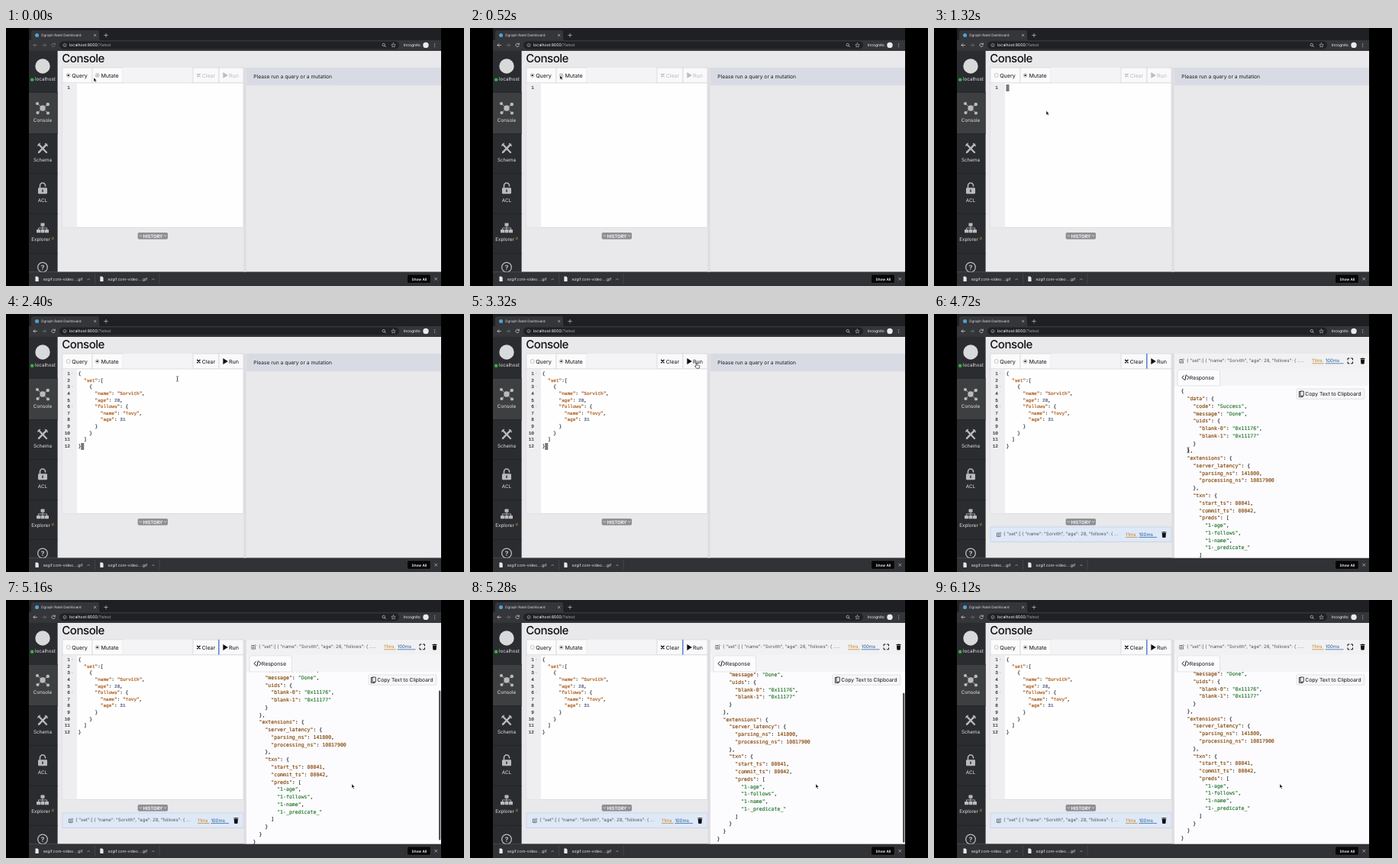
Recreate the animation shown at these times as an HTML page. Size 600 by 338 pixels, loop 6.2 s.

```html
<!DOCTYPE html>
<html lang="en">
<head>
<meta charset="utf-8">
<title>Console</title>
<style>
html, body { margin: 0; width: 100%; height: 100%; overflow: hidden; background: #000; }
svg { display: block; width: 100%; height: 100%; }
text { font-family: Inter, Roboto, sans-serif; white-space: pre; text-rendering: geometricPrecision; }
.line { fill: none; stroke-linecap: round; stroke-linejoin: round; }
.code text, .code tspan { font: 6.05px "Liberation Mono", monospace; }
.json text, .json tspan { font: 6.55px "DejaVu Sans Mono", monospace; }
.code text, .code tspan, .json text, .json tspan { fill: currentColor; stroke: currentColor; stroke-width: .16; }
</style>
</head>
<body>
<svg id="stage" viewBox="0 0 600 338"></svg>
<script>
const LOOP = 6200, STEP = 40;
const TOP = 29.8, BOTTOM = 319.7, SIDE = 67.6;
const person = "Sorvith", friend = "Tovy";

// Markup helpers
const rect = (x, y, w, h, fill, more = "") =>
  `<rect x="${x}" y="${y}" width="${w}" height="${h}" fill="${fill}" ${more}/>`;
const dot = (x, y, r, fill, more = "") => `<circle cx="${x}" cy="${y}" r="${r}" fill="${fill}" ${more}/>`;
const text = (x, y, size, fill, s, more = "") =>
  `<text x="${x}" y="${y}" font-size="${size}" fill="${fill}" color="${fill}" ${more}>${s}</text>`;
const fillPath = (d, fill, more = "") => `<path d="${d}" fill="${fill}" ${more}/>`;
const line = (d, color, width = .6, more = "") =>
  `<path class="line" d="${d}" stroke="${color}" stroke-width="${width}" ${more}/>`;
const group = (id, body, more = "") => `<g id="${id}" ${more}>${body}</g>`;
const at = (x, y, body) => `<g transform="translate(${x} ${y})">${body}</g>`;
const cross = (x, y, r, color, width) =>
  line(`M${x - r} ${y - r}l${2 * r} ${2 * r}m0 ${-2 * r}l${-2 * r} ${2 * r}`, color, width);

// One <text> per line, tokens coloured as key, string or number
function codeLines(src, x, y, pitch, base, key, str, num) {
  return src.split("\n").map((row, i) => text(x, (y + i * pitch).toFixed(2), 6, base,
    row.replace(/"[^"]*"(?=(:?))|\b\d+/g, (s, colon) =>
      `<tspan color="${s[0] !== '"' ? num : colon ? key : str}">${s}</tspan>`))).join("");
}

const query = { set: [{ name: person, age: 28, follows: { name: friend, age: 31 } }] };
const reply = {
  data: { code: "Success", message: "Done", uids: { "blank-0": "0x11176", "blank-1": "0x11177" } },
  extensions: {
    server_latency: { parsing_ns: 141800, processing_ns: 10817900 },
    txn: { start_ts: 80041, commit_ts: 80042, preds: ["1-age", "1-follows", "1-name", "1-_predicate_"] }
  }
};
const queryText = JSON.stringify(query, null, 2).replace(": [", ":[");
const brief = `{ "set":[ { "name": "${person}", "age": 28, "follows": { ...`;

// Icons
const trash = (x, y) => at(x, y,
  fillPath("M-3 -3.4h2l.5-.6h1l.5.6h2v.9h-6zM-2.6 -2.1h5.2l-.4 5.4q0 .7-.7.7h-3q-.7 0-.7-.7z", "#111"));
const edit = (x, y) => at(x, y, line("M.4-2h-3v4.6h4.6v-2.2", "#444", .7) +
  line("M-.9 1l.2-1.2 2.7-2.7 1 1-2.7 2.7z", "#444", .6));
const latency = (x, y, end) =>
  text(x, y, 6, "#c07f1c", "11ms") + text(x + 17.4, y, 6, "#1f5c9c", "100ms") +
  rect(x, y + 1.2, 15.5, .7, "#c07f1c") + rect(x + 17.4, y + 1.2, end - x - 17.4, .7, "#1f5c9c");
const radio = (id, x) => dot(x, 62, 2.5, "#fff", 'stroke="#888" stroke-width=".5"') + dot(x, 62, 1.3, "#333", `id="${id}"`);

function chrome() {
  const pale = "#dcdde0";
  const file = x => fillPath(`M${x - 2} 325.5h2.8l1.4 1.4v5.2h-4.2z`, "#e8eaed") +
    text(x + 8.2, 331.3, 5.15, "#e4e5e8", "ezgif.com-video....gif") +
    line(`M${x + 66.2} 329.8l1.4-1.4 1.4 1.4`, "#c4c6ca") + rect(x + 75.5, 321.5, .5, 14, "#55575b");
  return rect(30, 0, 540, 16, "#1f2023") + fillPath("M31 16q2 0 2-2v-8.5q0-2.5 2.5-2.5h84q2.5 0 2.5 2.5v8.5q0 2 2 2z", "#35363a") +
    dot(40.5, 9.5, 2.5, "#4fa3d8") + text(46.2, 11, 4.55, pale, "Dgraph Ratel Dashboard") +
    cross(116.6, 9.5, 1.3, pale, .6) + line("M128.7 9.5h4.6m-2.3-2.3v4.6", pale) +
    rect(30, 16, 540, TOP - 16, "#35363a") + rect(70, 17.5, 445, 10, "#202124", 'rx="5"') +
    group("nav", line("M40.6 22.5h-4.6m2-2l-2 2 2 2", pale, .7) +
      line("M64 21.2a2.2 2.2 0 1 0 .2 2M64.3 20v1.5h-1.5", pale, .7)) +
    line("M47.8 22.5h4.6m-2-2l2 2-2 2", "#77797d", .7) +
    dot(77, 22.5, 2, "none", `stroke="${pale}" stroke-width=".5"`) + rect(76.75, 22.2, .5, 1.4, pale) +
    text(83, 24.4, 5.2, "#fff", 'localhost:8000<tspan fill="#9aa0a6">/?latest</tspan>') +
    dot(494.7, 22, 1.7, "none", `stroke="${pale}" stroke-width=".6"`) + line("M496 23.3l1.5 1.5", pale, .7) +
    line("M507.5 19.9l.8 1.8 1.9.2-1.4 1.3.4 1.9-1.7-1-1.7 1 .4-1.9-1.4-1.3 1.9-.2z", pale, .5) +
    text(521, 24.3, 4.95, "#fff", "Incognito") + dot(550, 22.4, 3.7, "#e8eaed") +
    [20.6, 22.5, 24.4].map(y => dot(561.7, y, .5, pale)).join("") +
    rect(30, BOTTOM, 540, 338 - BOTTOM, "#303236") + file(40.5) + file(125.3) +
    rect(525.7, 323, 30.5, 11.3, "#060606", 'rx="1.5" stroke="#484a4e" stroke-width=".5"') +
    text(531.6, 330.5, 4.7, "#fff", "Show All", 'font-weight="600"') + cross(563.2, 328.7, 1.6, pale, .6);
}

function sidebar() {
  const ink = "#b9babc", back = "#2b2c2f";
  const label = (y, s) => text(48, y, 6.3, "#e2e2e4", s, 'text-anchor="middle"');
  const nodes = [[-7, -6, 2.1], [6.8, -5, 2.3], [-6.5, 6, 2.1], [7, 6.5, 2.1]];
  return rect(30, TOP, SIDE - 30, BOTTOM - TOP, back) + rect(30, 84, SIDE - 30, 54, "#3e3f41") +
    [84, 138, 190.5, 243, 295].map(y => rect(30, y, SIDE - 30, .6, "#1d1e20")).join("") +
    dot(48, 50, 9.7, "#d8d9db") + dot(34.2, 67.8, 2.3, "#2fb344") + text(38, 69.3, 6.3, "#e2e2e4", "localhost") +
    at(48, 105, dot(0, 0, 3.7, ink) + nodes.map(([x, y, r]) =>
      line(`M0 0L${x} ${y}`, ink, .7) + dot(x, y, r, ink)).join("")) + label(122.8, "Console") +
    at(48, 157.5, line("M-5-5L5 5.5", ink, 2.3) + line("M5-4.8L-5 5.3", ink, 2.5) +
      line("M-6.3-3.5l2.8-2.8M3.5-6l3 3", ink, 1.2)) + label(175.2, "Schema") +
    at(48, 210, rect(-6, -.8, 12, 8, ink, 'rx="1.2"') + line("M-3.5-1v-2.5a3.5 3.5 0 0 1 7 0v.5", ink, 1.6) +
      rect(-.7, 1.5, 1.4, 3.5, back)) + label(227.5, "ACL") +
    at(48, 262, [[-2.5, -6.5], [-8, 2], [-2.5, 2], [3, 2]].map(([x, y]) => rect(x, y, 5, 4.3, ink, 'rx=".6"')).join("") +
      line("M0-2v4M-5.5 2v-2h11v2", ink, .9)) + text(33.2, 279.2, 6.3, "#e2e2e4", "Explorer") +
    text(60.3, 276.5, 4.5, "#c9b04a", "β") +
    dot(48, 313.5, 6.3, "none", `stroke="${ink}" stroke-width="1.3"`) +
    text(48, 316.8, 9, ink, "?", 'text-anchor="middle" font-weight="700"');
}

function editor() {
  const edge = 'stroke="#cfced1" stroke-width=".6"';
  const numbers = n => text(84, (80 + n * 8.64).toFixed(2), 6, "#333", n + 1, 'text-anchor="end"');
  const history = rect(74, 279, 237, 19.5, "#dfe8f7", 'stroke="#b8c9e6" stroke-width=".6"') +
    edit(85, 289) + trash(301.3, 289);
  return text(73.3, 44.7, 15, "#111", "Console", 'font-weight="500" letter-spacing="-.45"') +
    rect(74, 52, 39, 20, "#fbfbfc", edge) + rect(113, 52, 40, 20, "#fbfbfc", edge) +
    rect(153, 52, 92, 20, "#f4f3f5") + rect(245, 52, 34, 20, "#f9f8fa", edge) + rect(279, 52, 32, 20, "#f9f8fa", edge) +
    radio("pickQuery", 81.7) + radio("pickMutate", 119.6) +
    text(86.2, 64.6, 7.1, "#111", "Query") + text(124.5, 64.6, 7.05, "#111", "Mutate") +
    group("actions", cross(252.3, 62, 1.7, "currentColor", 1.5) + text(256.8, 64.6, 6.9, "currentColor", "Clear") +
      fillPath("M284.3 58l6.5 4-6.5 4z", "currentColor") + text(291.9, 64.6, 7.1, "currentColor", "Run")) +
    group("focus", rect(278, 52, 1.5, 20, "#5b83d6")) +
    rect(74, 72, 237, 189.5, "#fefefe", edge) + rect(74.3, 72.3, 18.7, 189, "#eeedef") +
    `<g class="code">` + numbers(0) +
    group("query", Array.from({ length: 11 }, (_, i) => numbers(i + 1)).join("") +
      [0, 2, 5].map(i => fillPath(`M85.8 ${77.5 + i * 8.64}h1.8l-.9 1z`, "#aaa")).join("") +
      codeLines(queryText, 94.8, 80, 8.64, "#20282c", "#a8500a", "#a8500a", "#4b4a7c")) + `</g>` +
    rect(94.5, 74, 4, 9, "#75777b", 'id="caret"') +
    rect(172.6, 268, 39.4, 8.8, "#8e9094", 'rx="1.8"') + text(179.6, 274.5, 6, "#fff", "HISTORY", 'font-weight="600" letter-spacing="-.1"') +
    line("M175.2 271.8l1.2 1.2 1.2-1.2M207.3 271.8l1.2 1.2 1.2-1.2", "#fff", .7) +
    group("history", history + group("longItem", text(91, 290.4, 6, "#505053", brief + " } } ] }")) +
      group("shortItem", text(91, 290.4, 6, "#505053", brief) + latency(251, 290.8, 292)));
}

function results() {
  const head = rect(315, 52, 255, 19.5, "#f1f0f2") + edit(324.5, 61.5) + trash(561.5, 61.5) +
    line("M542 60v-2h2m2.5 0h2v2m0 2.8v2h-2m-2.5 0h-2v-2", "#111", 1);
  return rect(311.5, 52, 3, 268, "#dddce0") +
    group("idle", rect(315, 52, 255, 23, "#d9dbe4") + text(324.3, 65.6, 6.7, "#1b1b1d", "Please run a query or a mutation")) +
    group("ran", head + rect(315, 71.5, 255, 248.5, "#f8f7f9") +
      group("fetch", text(331, 62.9, 6, "#505053", brief + " } } ] }") +
        line("M430 187a12.3 12.3 0 0 0 24 0", "#333", .8, 'id="spinner"') +
        text(406.8, 218.3, 6.5, "#111", "Fetching result...", 'letter-spacing="1"')) +
      group("reply", text(331, 62.9, 6, "#505053", brief + "..") + latency(495.3, 63.3, 536.5) +
        rect(315, 71.5, 255, 22.5, "#f4f3f6") +
        rect(315, 94, 255, 226, "#fcfbfd") +
        fillPath("M319 94v-19q0-2 2-2h51.5q2 0 2 2v19z", "#fcfbfd", 'stroke="#d4d3d8" stroke-width=".6"') +
        line("M327.3 80.8l-2.2 2.5 2.2 2.5M331.8 80.8l2.2 2.5-2.2 2.5M330.3 80l-1.5 6.6", "#111", 1) +
        text(334.8, 85.7, 6.95, "#111", "Response") +
        `<g class="json" clip-path="url(#pane)">` +
        group("scroll", codeLines(JSON.stringify(reply, null, 2), 323.6, 103.2, 9.77, "#26282c", "#84480a", "#267a30", "#84480a")) + `</g>` +
        rect(567, 94, 2.4, 196, "#505054", 'id="thumb" rx="1.1"') +
        rect(475, 98, 89, 13.5, "#f6f5f8", 'rx="1.5" stroke="#d6d5da" stroke-width=".6"') +
        line("M480 101.5h-1.6v7.2h4.6v-1M480 101.5v5.8h4.2v-5.8z", "#111", .8) +
        text(486.3, 107.2, 6.75, "#111", "Copy Text to Clipboard")));
}

const outline = 'stroke="#fff" stroke-width=".5"';
const pointers =
  group("arrow", fillPath("M0 0V5.4L1.3 4.2 2.2 6.2 3.2 5.7 2.3 3.9H4Z", "#000", outline)) +
  group("beam", line("M-1.3-3.3q1.3 0 1.3.8v5q0 .8-1.3.8M1.3-3.3q-1.3 0-1.3.8v5q0 .8 1.3.8", "#333", .6)) +
  group("hand", fillPath("M-.6 0q.6-.6 1.2 0v2.3l2.8.6q.8.2.7 1l-.5 2.8h-3.6l-2.3-2.8q.2-.9 1.7.1z", "#fff", 'stroke="#000" stroke-width=".6"'));

stage.innerHTML = `<clipPath id="pane"><rect x="315" y="94" width="255" height="226"/></clipPath>` +
  rect(30, TOP, 540, BOTTOM - TOP, "#e9e8ea") + editor() + results() + sidebar() + chrome() + group("mouse", pointers);

const el = id => document.getElementById(id);
const show = (id, on) => { el(id).style.display = on ? "" : "none"; };
const clamp = v => Math.min(1, Math.max(0, v));

// Pointer stops: time, x, y
const path = [
  [0, 115, 65], [600, 118, 62], [1120, 118, 62], [1320, 147, 108.5], [2080, 147, 108.5],
  [2400, 224.5, 85], [2680, 298, 65.5], [3320, 296.7, 64.5], [4240, 296.7, 64.5],
  [4280, 297, 123], [4480, 259, 300], [4720, 333, 178], [4880, 453, 241], [LOOP, 453, 241]
];

function pointerAt(t) {
  const i = Math.max(1, path.findIndex(p => p[0] > t));
  const [a, b] = [path[i - 1], path[i]];
  const u = (t - a[0]) / (b[0] - a[0]), k = u * u * (3 - 2 * u);
  return [a[1] + (b[1] - a[1]) * k, a[2] + (b[2] - a[2]) * k];
}

function draw(t) {
  const mutate = t >= 720, pasted = t >= 2120, ran = t >= 3640, done = t >= 4160;
  el("nav").style.opacity = t < 320 ? .45 : 1;
  show("pickQuery", !mutate);
  el("pickMutate").setAttribute("fill", mutate ? "#333" : "#ccc");
  el("pickMutate").setAttribute("r", mutate ? 1.3 : 2.3);
  el("actions").style.color = pasted ? "#111" : "#bdbcc0";
  show("query", pasted);
  show("focus", t >= 3400);

  const since = t - (pasted ? 2120 : 1320);
  show("caret", since >= 0 && t < 3400 && since % 1100 < 560);
  el("caret").setAttribute("transform", pasted ? "translate(3.7 95)" : "");

  show("history", ran);
  show("longItem", !done);
  show("shortItem", done);
  show("idle", !ran);
  show("ran", ran);
  show("fetch", !done);
  show("reply", done);
  el("spinner").setAttribute("transform", `rotate(${(t - 3640) * .36} 442 184)`);

  const k = 1 - (1 - clamp((t - 4900) / 540)) ** 3;
  el("scroll").setAttribute("transform", `translate(0 ${-33.4 * k})`);
  el("thumb").setAttribute("transform", `translate(0 ${28.5 * k})`);
  el("thumb").style.opacity = t < 4920 ? 0 : 1 - clamp((t - 5800) / 320);

  const [x, y] = pointerAt(t);
  const hand = t >= 2640 && t < 4280;
  const beam = (t >= 2120 && t < 2600) || (t >= 4640 && t < 4840);
  el("mouse").setAttribute("transform", `translate(${x} ${y})`);
  show("hand", hand);
  show("beam", beam);
  show("arrow", !hand && !beam);
}

const start = performance.now();
function tick() {
  const t = (performance.now() - start) % LOOP;
  draw(Math.floor(t / STEP) * STEP);
  requestAnimationFrame(tick);
}
tick();
</script>
</body>
</html>
```
